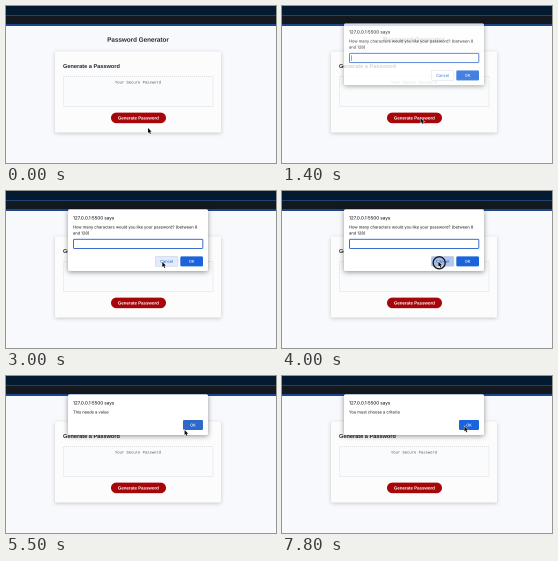
These frames come from a looping animation (270 px wide and 157 px high, 8 s). An HTML page with a canvas:

```html
<!DOCTYPE html>
<html lang="en">
<head>
<meta charset="utf-8">
<title>Password Generator</title>
<style>
html, body { margin: 0; width: 100%; height: 100%; overflow: hidden; background: #f8f9fc; }
canvas { display: block; width: 100vw; height: 100vh; }
</style>
</head>
<body>
<canvas id="stage"></canvas>
<script>
const W = 270, H = 157, LOOP = 8000, STEP = 100, SUPER = 4;
const canvas = document.getElementById('stage');
const view = canvas.getContext('2d');
const SANS = '"Liberation Sans", Arial, sans-serif';
const UI = 'Inter, Roboto, sans-serif';
const MONO = '"Liberation Mono", monospace';

// Drawn larger and reduced, so that small text keeps its true proportions
const scene = document.createElement('canvas').getContext('2d');
const layer = document.createElement('canvas').getContext('2d');
let ctx = scene;

const clamp = v => Math.max(0, Math.min(1, v));
const progress = (t, a, b) => clamp((t - a) / (b - a));
const ease = p => p * p * (3 - 2 * p);

// Cursor tip positions: [time, x, y]
const path = [
  [0, 142, 122], [400, 138.6, 112], [1800, 138.6, 112],
  [2200, 141.6, 93.3], [2700, 156, 72], [2800, 156, 72],
  [3100, 156.4, 70.6], [4800, 156.4, 70.6], [5700, 181.8, 51.6],
  [5900, 181.8, 51.6], [6300, 182.4, 50.4], [8000, 182.4, 50.4]
];

function cursorAt(t) {
  let i = 0;
  while (i < path.length - 2 && t >= path[i + 1][0]) i++;
  const [ta, xa, ya] = path[i], [tb, xb, yb] = path[i + 1];
  const p = ease(progress(t, ta, tb));
  return [xa + (xb - xa) * p, ya + (yb - ya) * p];
}

function rect(x, y, w, h, fill) {
  ctx.fillStyle = fill;
  ctx.fillRect(x, y, w, h);
}

function round(x, y, w, h, r, fill, stroke, line = 1) {
  ctx.beginPath();
  ctx.roundRect(x, y, w, h, r);
  if (fill) { ctx.fillStyle = fill; ctx.fill(); }
  if (stroke) { ctx.strokeStyle = stroke; ctx.lineWidth = line; ctx.stroke(); }
}

function shadowed(blur, dy, color, draw) {
  const k = ctx.getTransform().a;
  ctx.save();
  ctx.shadowColor = color;
  ctx.shadowBlur = blur * k;
  ctx.shadowOffsetY = dy * k;
  draw();
  ctx.restore();
}

function text(str, x, y, font, color, align = 'left') {
  ctx.font = font;
  ctx.textAlign = align;
  ctx.textRendering = 'geometricPrecision';
  ctx.fillStyle = color;
  ctx.fillText(str, x, y);
}

function page() {
  rect(0, 0, W, H, '#f8f9fc');
  rect(0, 0, W, 9, '#041a31');
  rect(0, 9, W, 1, '#1d4374');
  rect(0, 10, W, 8, '#14181f');
  rect(0, 18, W, 2, '#1b468c');
  text('Password Generator', 132, 35.8, `bold 6.3px ${SANS}`, '#24282c', 'center');

  shadowed(4, 1, 'rgba(0,0,0,.2)', () => round(49, 45.5, 166, 81, 1.5, '#fcfcfd'));
  text('Generate a Password', 57, 62, `bold 5.6px ${SANS}`, '#24282c');
  ctx.setLineDash([1, 1]);
  round(57.5, 70.5, 149.5, 30, 0.5, '#fafbfc', '#d3d6d9', 0.7);
  ctx.setLineDash([]);
  text('Your Secure Password', 132, 77.5, `3.85px ${MONO}`, '#555', 'center');
  round(105, 106.6, 55, 10.6, 5.3, '#a60509');
  text('Generate Password', 132.4, 113.5, `bold 4.4px ${SANS}`, '#fff', 'center');
}

function button(label, x, y, w, fill, color, stroke) {
  round(x, y, w, 10, 1.2, fill, stroke, 0.5);
  text(label, x + w / 2, y + 6.4, `500 3.9px ${UI}`, color, 'center');
}

// Composed on its own layer so that the fade treats it as one piece
function dialog(alpha, height, lines, content) {
  if (alpha <= 0) return;
  ctx = layer;
  ctx.clearRect(0, 0, W, H);
  shadowed(5, 1.2, 'rgba(0,0,0,.42)', () => round(62, 18.3, 140, height, 1.5, '#fff'));
  text('127.0.0.1:5500 says', 67, 28.5, `500 4.5px ${UI}`, '#202124');
  lines.forEach((s, i) => text(s, 67, 37.6 + i * 6, `500 4px ${UI}`, '#303236'));
  content();
  ctx = scene;
  ctx.globalAlpha = alpha;
  ctx.drawImage(layer.canvas, 0, (alpha - 1) * 5, W, H);
  ctx.globalAlpha = 1;
}

function prompt(t, alpha) {
  dialog(alpha, 61.7, ['How many characters would you like your password? (between 8', 'and 128)'], () => {
    round(67.5, 48.3, 129.3, 9.2, 1, '#fff', '#3a6fce', 1);
    const caretOn = t < 2000 || Math.floor(t / 500) % 2 === 1;
    if (caretOn) rect(69.4, 50.2, 0.5, 5.6, '#333');
    button('Cancel', 149.3, 65.4, 22.6, '#fff', '#2f6bd0', '#d3d8e0');
    ctx.globalAlpha = progress(t, 2600, 2900);
    button('Cancel', 149.3, 65.4, 22.6, t >= 4000 ? '#b3c6ea' : '#e3ebfa', '#2f6bd0', '#c9d5ea');
    ctx.globalAlpha = 1;
    button('OK', 174.3, 65.4, 22.7, '#1964dc', '#fff');
  });
}

function alertBox(message, alpha, fill) {
  dialog(alpha, 40.7, [message], () => button('OK', 177, 44, 20, fill, '#fff'));
}

function ring(x, y) {
  ctx.beginPath();
  ctx.arc(x, y, 6, 0, Math.PI * 2);
  ctx.fillStyle = 'rgba(90,110,150,.12)';
  ctx.fill();
  ctx.strokeStyle = '#10151d';
  ctx.lineWidth = 1.3;
  ctx.stroke();
}

function arrow(x, y) {
  ctx.save();
  ctx.translate(x, y);
  ctx.beginPath();
  [[0, 0], [0, 5], [1.1, 4], [2, 6], [2.9, 5.6], [2, 3.7], [3.6, 3.6]]
    .forEach(([px, py]) => ctx.lineTo(px, py));
  ctx.closePath();
  ctx.strokeStyle = 'rgba(255,255,255,.85)';
  ctx.lineWidth = 0.9;
  ctx.stroke();
  ctx.fillStyle = '#080808';
  ctx.fill();
  ctx.restore();
}

function render(t) {
  page();
  if (t < 4100) prompt(t, progress(t, 1140, 1460));
  else if (t < 4200) prompt(t, 0.35);

  const firstOut = 1 - progress(t, 7250, 7450);
  const hover = t >= 5500 && t < 7500;
  if (t >= 4100) {
    alertBox('This needs a value', Math.min(progress(t, 4050, 4210), firstOut), hover ? '#2e69ca' : '#1964dc');
  }
  alertBox('You must choose a criteria', progress(t, 7400, 7700), '#1964dc');

  const [x, y] = cursorAt(t);
  const clicks = [[1000, 1200], [4000, 4100], [7100, 7300]];
  if (clicks.some(([a, b]) => t >= a && t < b)) ring(x + 0.8, y + 1.2);
  arrow(x, y);
}

function resize(w, h) {
  canvas.width = w;
  canvas.height = h;
  view.imageSmoothingQuality = 'high';
  for (const c of [scene, layer]) {
    c.canvas.width = w * SUPER;
    c.canvas.height = h * SUPER;
    c.setTransform(w * SUPER / W, 0, 0, h * SUPER / H, 0, 0);
  }
}

function frame(now) {
  const k = devicePixelRatio || 1;
  const w = Math.round(innerWidth * k), h = Math.round(innerHeight * k);
  if (canvas.width !== w || canvas.height !== h) resize(w, h);
  render(Math.floor((now % LOOP) / STEP) * STEP);
  view.drawImage(scene.canvas, 0, 0, w, h);
  requestAnimationFrame(frame);
}
requestAnimationFrame(frame);
</script>
</body>
</html>
```
